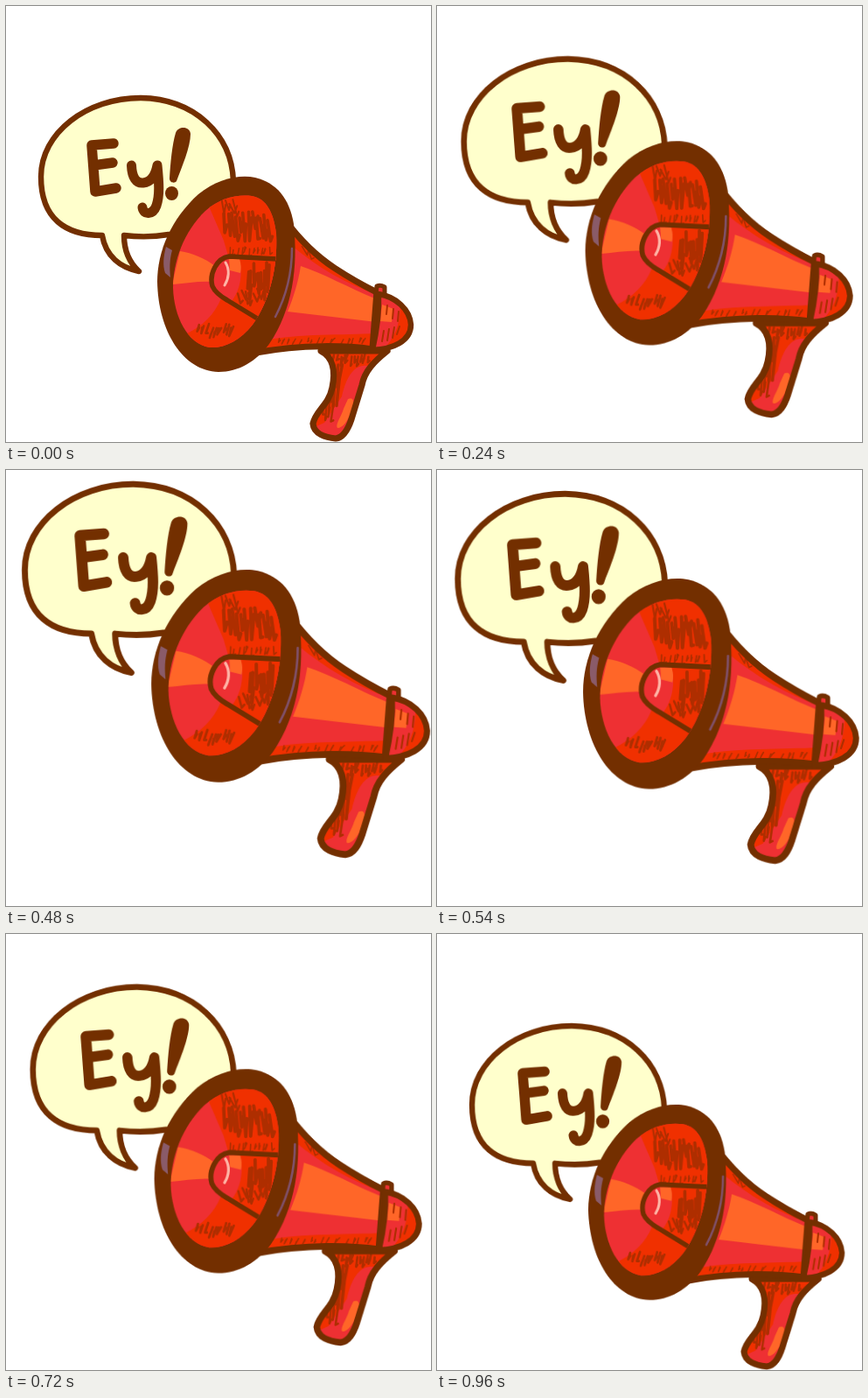
Animation, 486 px wide and 498 px high, one loop 1.39 s. Source, as an HTML page:

```html
<!DOCTYPE html>
<html lang="es">
<head>
<meta charset="utf-8">
<title>Ey!</title>
<style>
html, body { margin: 0; width: 100%; height: 100%; overflow: hidden; background: #fff; }
svg { display: block; width: 486px; height: 498px; }
#art { transform-origin: 0 0; }
path, ellipse { stroke-linecap: round; stroke-linejoin: round; }
.line { fill: none; stroke: #732f00; }
.edge { stroke: #732f00; }
.ink { fill: #732f00; }
.red { fill: #ee3033; }
.hot { fill: #f03000; }
.org { fill: #ff6628; }
.hatch { fill: none; stroke: #ae2e00; }
</style>
</head>
<body>
<svg viewBox="0 0 486 498" role="img" aria-label="Ey!">
  <defs>
    <path id="mouth" d="M191 322C191 292 203 258 228 234C245 219 264 215 281 217C298 220 306 236 309 260C311 296 302 336 282 364C268 382 250 391 233 390C207 386 192 354 191 322Z"/>
    <path id="grip" d="M360 394C374 401 377 417 373 436C369 456 354 462 351 477C352 489 366 493 377 494C386 493 391 484 395 472L407 433C410 417 421 406 436 394Z"/>
    <path id="horn" d="M318 243C335 266 352 284 376 299.500C392 310 410 320 424 327L419 392C390 388 340 386 286 396Z"/>
    <path id="cap" d="M426 329C446 332 462 347 463 364C463 383 442 392 419 393C424 371 427 350 426 329Z"/>
    <clipPath id="inMouth"><use href="#mouth"/></clipPath>
    <clipPath id="inGrip"><use href="#grip"/></clipPath>
    <clipPath id="inHorn"><use href="#horn"/></clipPath>
    <clipPath id="inCap"><use href="#cap"/></clipPath>
  </defs>
  <g id="art">
    <!-- speech bubble -->
    <path class="edge" fill="#ffffcc" stroke-width="6.400" d="M40 195C40 145 92 105 154 105C216 106 258 147 260 200L240 262L186 261C168 264 152 264 135 262C135 278 141 293 152 303C131 299 114 286 110 262C68 262 40 243 40 195Z"/>
    <path class="line" stroke-width="11.500" d="M123 157L98 159L102 212L126 208M100 182L122 179"/>
    <path class="line" stroke-width="11" d="M143.500 182C144 196 149 203 157 202C166 201 171 193 173 182C175 202 176 216 172 228C168 239 157 239 156 230"/>
    <path class="ink" d="M194 145C197 137 210 137 211 146C211 161 201 184 195 200C193 203 187 202 187 197C188 180 190 158 194 145Z"/>
    <ellipse class="ink" cx="189.500" cy="214" rx="7.500" ry="8"/>

    <!-- grip -->
    <use href="#grip" class="red"/>
    <g clip-path="url(#inGrip)">
      <path class="hot" d="M345 390H440L413 411C398 409 389 424 384 446L364 476L346 484Z"/>
      <g id="gripHatch"></g>
      <path class="org" d="M391 449C398 446 399 453 395 463C391 474 385 482 379 482C376 478 384 468 386 460Z"/>
    </g>
    <use href="#grip" class="line" stroke-width="7.200"/>

    <!-- horn body -->
    <use href="#horn" class="red"/>
    <g clip-path="url(#inHorn)">
      <path class="hot" d="M325 245L428 322V331C392 319 358 300 327 274Z"/>
      <path class="org" d="M337 297C362 305 392 322 424 335V361L322 349C329 332 334 316 337 297Z"/>
      <path class="hot" d="M295 382C335 374 385 376 424 374V395H290Z"/>
      <g id="hornHatch"></g>
    </g>
    <use href="#horn" class="line" stroke-width="7.200"/>

    <!-- button and cap -->
    <path class="red edge" stroke-width="5" d="M423 329L424 320Q428 318 433 321L433 331Z"/>
    <use href="#cap" class="red"/>
    <g clip-path="url(#inCap)">
      <path class="hot" d="M450 333L470 350V390L425 398Q455 374 450 333Z"/>
      <path class="org" d="M430 341L443 346L441 361L428 360Z"/>
      <path class="hatch" stroke-width="2" d="M436 342L435 352M443 346L442 357M449 349L448 360M432 371L430 383M438 369L436 382M444 367L442 379M450 366L447 375"/>
    </g>
    <use href="#cap" class="line" stroke-width="6.400"/>

    <!-- rim and opening -->
    <path class="ink" d="M173 315C173 280 189 243 220 215C241 198 266 192 285 196C309 202 324 219 329 249C334 298 328 346 301 386C286 406 266 418 243 418C202 417 174 371 173 315Z"/>
    <path fill="none" stroke="#805068" stroke-width="2.500" d="M327 277C327 304 320 332 308 355"/>
    <path fill="#8a5b69" d="M183 275L190 279C187 290 187 299 188 310L182 305C179 296 180 286 183 275Z"/>
    <use href="#mouth" class="red"/>
    <g clip-path="url(#inMouth)">
      <path class="hot" d="M230 224L250 205H315V292H256L249 268Z"/>
      <path class="org" d="M190 318L199 280C213 282 227 288 239 297L235 315C220 314 206 317 190 318Z"/>
      <path class="hot" d="M246 334L293 362L267 392H222L207 374C225 365 238 353 246 334Z"/>
      <g id="mouthHatch"></g>
      <path class="red" d="M312 289L255 287C239 292 230 311 237 323L247 333L292 360Z"/>
      <path class="hot" d="M267 289H312L294 358L258 337C268 324 271 306 267 289Z"/>
      <path class="org" d="M255 289H267C269 295 269 300 268 305L256 302Z"/>
      <g id="coneHatch"></g>
      <path fill="none" stroke="#ffb5a6" stroke-width="3" d="M251 293C256 301 255 311 250 319"/>
      <path class="line" stroke-width="5.500" d="M312 289L255 286C241 288 232 306 236 320C239 327 246 332 253 336L294 361"/>
    </g>
  </g>
</svg>
<script>
let seed = 11;
const rnd = () => (seed = seed * 16807 % 2147483647) / 2147483647;

// Loose pencil strokes spread over a slanted patch
function hatch(id, x, y, w, h, n, lean, width) {
  let d = '';
  for (let i = 0; i < n; i++) {
    const px = x + w * (i + rnd() * .6) / n;
    const top = y + rnd() * h * .3;
    const len = h * (.35 + rnd() * .4);
    d += `M${px} ${top}l${lean + rnd() * 3} ${len}l${1 + rnd() * 2} ${-len * rnd()}`;
  }
  const p = document.createElementNS('http://www.w3.org/2000/svg', 'path');
  p.setAttribute('d', d);
  p.setAttribute('class', 'hatch');
  p.setAttribute('stroke-width', width);
  document.getElementById(id).append(p);
}

hatch('mouthHatch', 249, 231, 52, 46, 12, 1, 3.6);
hatch('mouthHatch', 246, 218, 16, 28, 4, 3, 2);
hatch('mouthHatch', 255, 275, 50, 12, 11, -2, 1.6);
hatch('mouthHatch', 220, 363, 44, 16, 9, -5, 2.6);
hatch('coneHatch', 276, 293, 28, 46, 8, -2, 3.6);
hatch('coneHatch', 264, 322, 26, 23, 6, 2, 2.4);
hatch('hornHatch', 310, 379, 105, 9, 16, -4, 1.5);
hatch('hornHatch', 335, 268, 55, 22, 7, 5, 1.5);
hatch('gripHatch', 370, 397, 48, 15, 12, -3, 2.5);
hatch('gripHatch', 371, 407, 15, 55, 6, -5, 3.4);
hatch('gripHatch', 359, 444, 18, 32, 5, -4, 2.4);

const small = 'translate(0px, 0px) scale(1)';
const large = 'translate(-22px, -98px) scale(1.0875)';
const loop = 1390, easing = 'steps(16, end)';
document.getElementById('art').animate([
  { offset: 0, transform: small, easing },
  { offset: 480 / loop, transform: large, easing },
  { offset: 960 / loop, transform: small },
  { offset: 1, transform: small }
], { duration: loop, iterations: Infinity });
</script>
</body>
</html>
```
